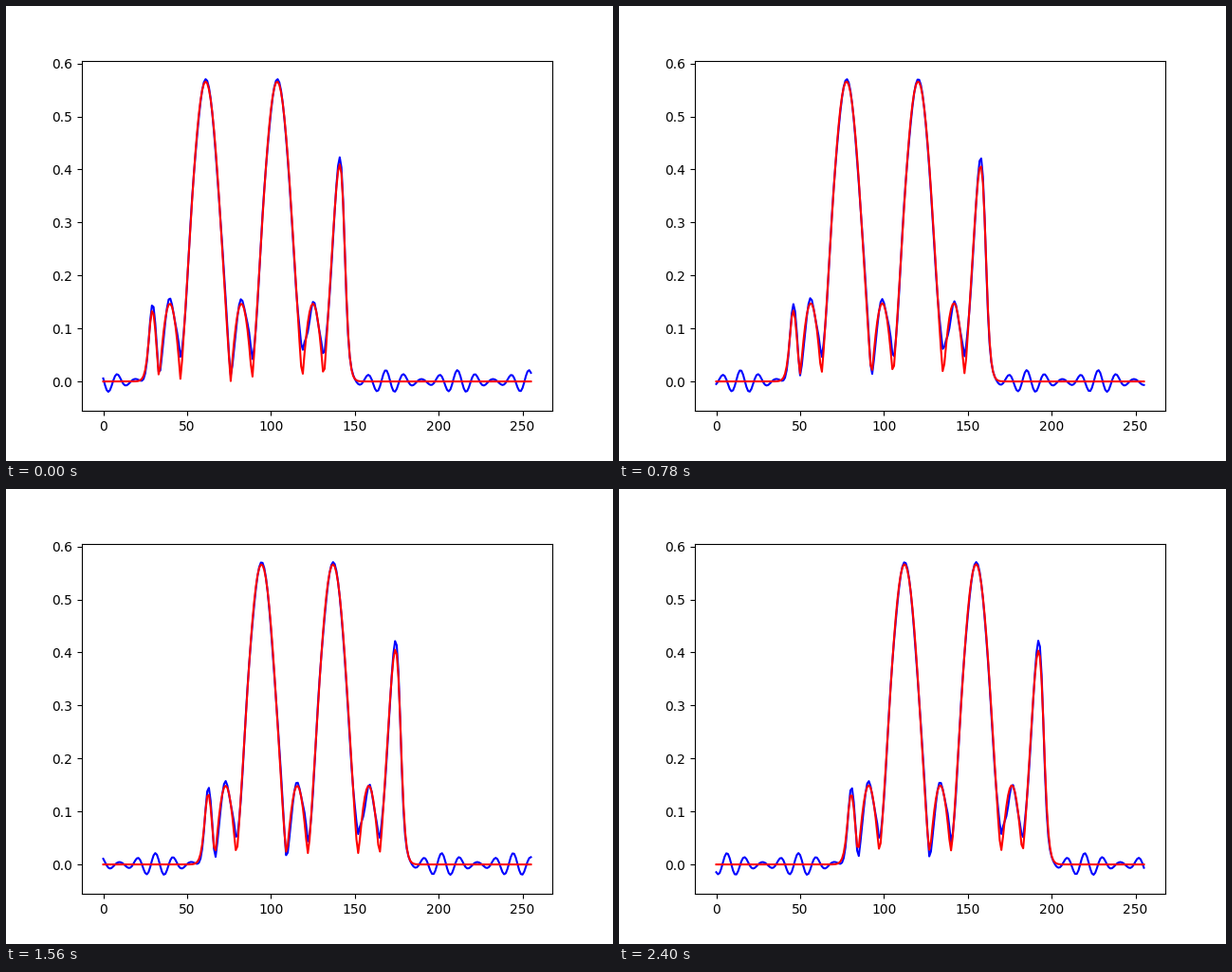
A matplotlib script for the animation above (2460 ms loop, 640 by 480 pixels).

```python
import numpy as np
import matplotlib.pyplot as plt
from matplotlib.animation import FuncAnimation

SIZE = 256              # points on the periodic line
FRAMES = 41
SPEED = SIZE / 200      # points travelled per frame
PERIOD = SIZE / 6
CREST = 61.05
LEFT, RIGHT = 28.4, 143.8
KINKS = (45.7, 88.1, 118.9, 131.3)   # corners the noisy curve rounds off

x = np.arange(SIZE)


def turn(s, start, period=PERIOD):
    return np.cos(2 * np.pi * (s - start) / period)


def window(s, n):
    steep = .75 - .00125 * n
    rise = 1 / (1 + np.exp(-(steep + .1) * (s - LEFT)))
    fall = 1 / (1 + np.exp(steep * (s - RIGHT)))
    return rise * fall


def packet(s, n, floor):
    wave = .2095 + .3565 * turn(s, CREST)
    return window(s, n) * np.hypot(wave, floor)


def ripple(s):
    swell = .013 + .0085 * turn(s, 169)
    return swell * turn(s, 253.8, PERIOD / 4)


def ringing(s, center, height):
    return height * np.exp(-((s - center) / 5) ** 2) * turn(s, center, PERIOD / 4)


def curves(n):
    s = (x - SPEED * n) % SIZE
    clean = packet(s, n, .0042 * np.sqrt(n))
    rough = packet(s, 0, .02) + ripple(s) + ringing(s, 141.3, .02)
    for kink in KINKS:
        rough += ringing(s, kink, .046)
    return rough, clean


fig, ax = plt.subplots(figsize=(6.4, 4.8), dpi=100)
ax.set_xlim(-12.75, 267.75)
ax.set_ylim(-.05563, .60547)
lines = [ax.plot(x, y, color=c, lw=1.5)[0] for y, c in zip(curves(0), "br")]


def draw(n):
    for line, y in zip(lines, curves(n)):
        line.set_ydata(y)
    return lines


anim = FuncAnimation(fig, draw, frames=FRAMES, interval=60, repeat=True)
plt.show()
```
